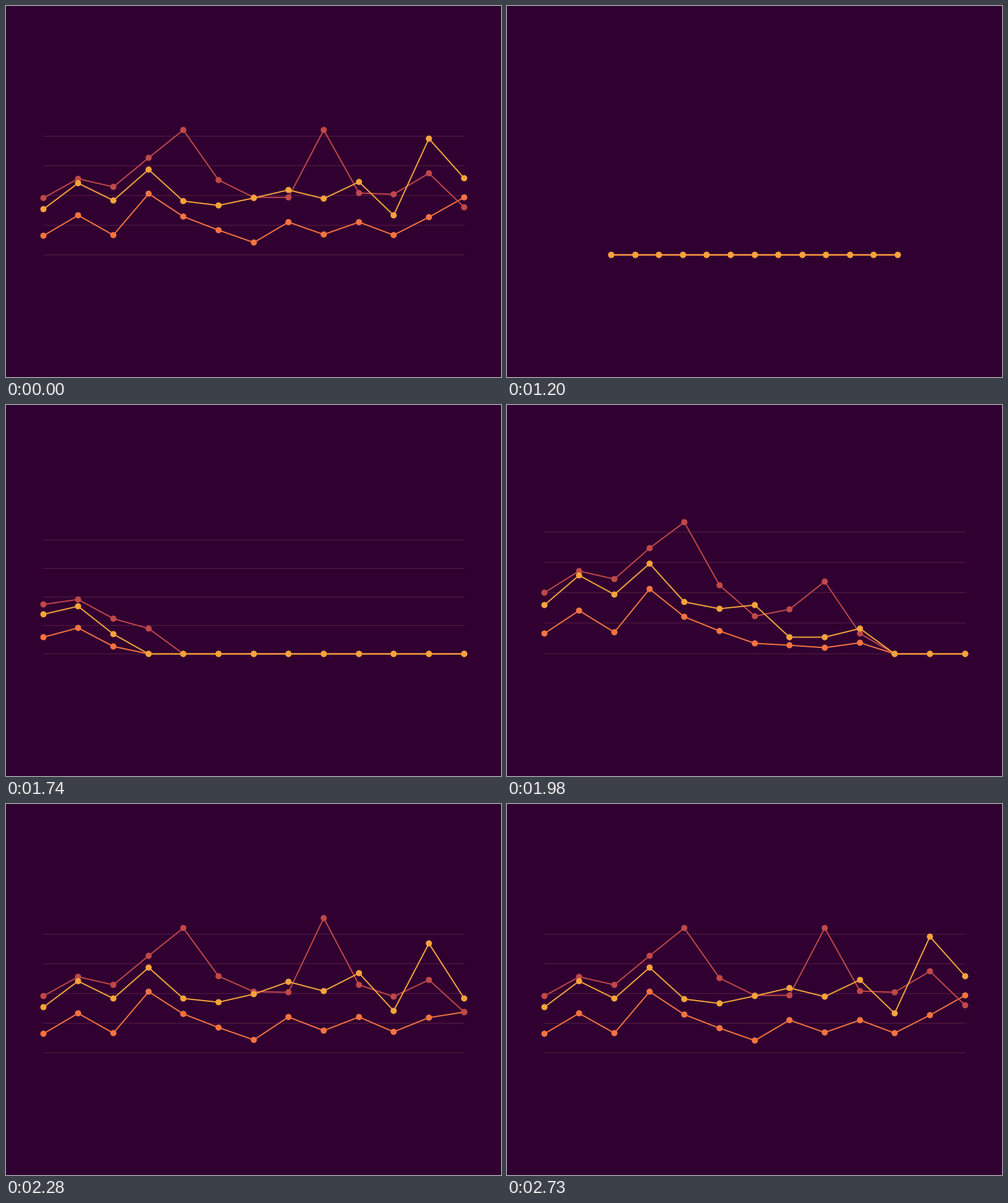
Write a matplotlib script that moves like this. It is 800 by 600 pixels and loops after 3.23 s.

```python
import numpy as np
import matplotlib.pyplot as plt
from matplotlib.animation import FuncAnimation
from matplotlib.patches import Circle

W, H, DPI = 800, 600, 100
LOOP, TICK = 3230, 10
BASE, LEFT, SPAN, COUNT = 402, 60, 680, 13
RADIUS = 5

# start and length of each stage in ms
POP = (596.3, 500)
SPREAD = (1126, 450)
GRID = (1590, 450)
RISE = 540

BG, GRID_COLOR = "#300030", "#581E44"


def sweep(*delays):
    """Start times of the points' rise, left to right, from a few key delays."""
    return GRID[0] + np.interp(range(COUNT), (0, 4, 6, 7, 9, 10, 12), (0, *delays))


WARM = sweep(206, 244, 359, 346, 450, 581)
RED = sweep(157, 293, 267, 348, 520, 545)

# colour, value of each point in pixels above the base, start times
SERIES = [
    ("#F47340", (31, 64, 32, 99, 62, 40, 20, 53, 33, 53, 32, 61, 93), WARM),
    ("#C04848", (92, 123, 110, 157, 202, 121, 93, 93, 202, 100, 98, 132, 77), RED),
    ("#F5A33C", (74, 116, 88, 138, 87, 80, 92, 105, 91, 118, 64, 188, 124), WARM),
]


def progress(t, start, length):
    return np.clip((t - start) / length, 0, 1)


def back_out(p, s=1.70158):
    u = p - 1
    return 1 + (s + 1) * u**3 + s * u**2


def expo_out(p):
    return np.where(p >= 1, 1.0, 1 - 2.0 ** (-10 * p))


def elastic_out(p, amp=2, period=0.3):
    if p >= 1:
        return 1.0
    shift = period / (2 * np.pi) * np.arcsin(1 / amp)
    return 1 + amp * 2 ** (-10 * p) * np.sin((p - shift) * 2 * np.pi / period)


def pixel(v):
    """Centre of the pixel that holds v."""
    return np.floor(v + 1e-6) + 0.5


def px(width):
    return width * 72 / DPI


fig = plt.figure(figsize=(W / DPI, H / DPI), dpi=DPI, facecolor=BG)
ax = fig.add_axes([0, 0, 1, 1])
ax.set_xlim(0, W)
ax.set_ylim(H, 0)
ax.axis("off")

rules = [ax.plot([LEFT, LEFT + SPAN + 1], [0, 0], color=GRID_COLOR, lw=px(1),
                 solid_capstyle="butt", snap=False, zorder=1)[0]
         for _ in range(5)]


class Series:
    def __init__(self, color, values, starts, z):
        self.heights = np.array(values) - 0.5
        self.starts = starts
        self.line, = ax.plot([], [], color=color, lw=px(2), zorder=z,
                             solid_joinstyle="round", solid_capstyle="butt",
                             snap=False)
        self.dots = [ax.add_patch(Circle((0, 0), RADIUS, fc=color, lw=0, zorder=z + 1))
                     for _ in range(COUNT)]

    def update(self, t, xs, scale):
        shown = t >= 600
        ys = pixel(BASE - self.heights * back_out(progress(t, self.starts, RISE)))
        self.line.set_data(xs, ys)
        self.line.set_visible(shown and t > SPREAD[0])
        for dot, x, y in zip(self.dots, xs, ys):
            dot.center = x, y
            dot.set_radius(RADIUS * scale)
            dot.set_visible(shown)


series = [Series(*spec, z=2 + 2 * k) for k, spec in enumerate(SERIES)]
slots = np.linspace(-0.5, 0.5, COUNT)


def draw(i):
    t = i * TICK
    # the finished chart opens the loop, then the state moves in 30 ms steps
    t = LOOP if t < 100 else t // 30 * 30

    xs = pixel(W / 2 + slots * SPAN * expo_out(progress(t, *SPREAD)))
    scale = max(elastic_out(progress(t, *POP)), 0)
    for s in series:
        s.update(t, xs, scale)

    step = 48 * back_out(progress(t, *GRID))
    for k, rule in enumerate(rules):
        y = pixel(BASE - k * step)
        rule.set_ydata([y, y])
        rule.set_visible(t >= GRID[0])
    return []


anim = FuncAnimation(fig, draw, frames=LOOP // TICK, interval=TICK,
                     repeat=True, repeat_delay=0, blit=False)
plt.show()
```
